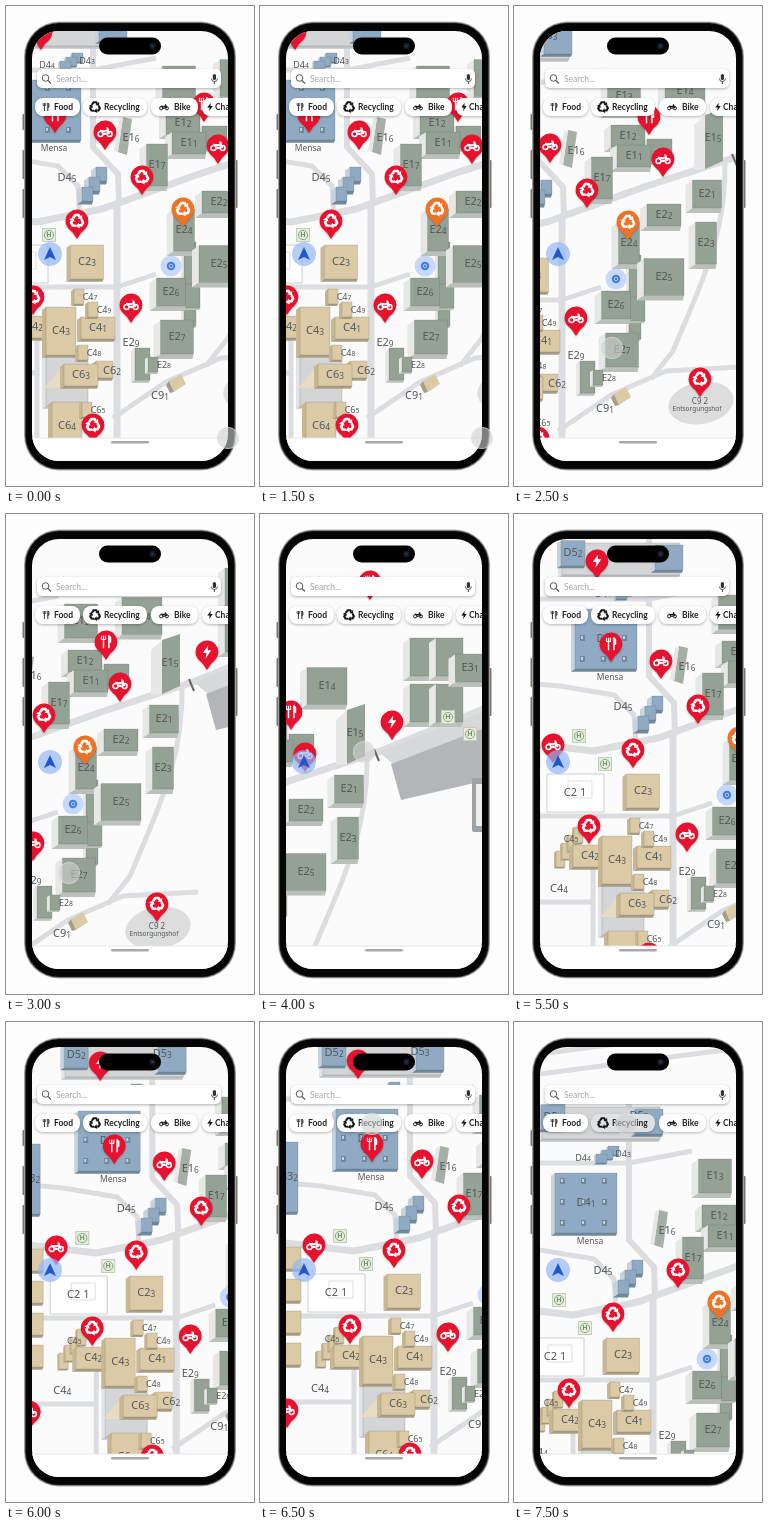
These frames come from a looping animation (248x480 px, 8 s). An HTML page with a canvas:

```html
<!DOCTYPE html>
<html lang="en">
<head>
<meta charset="utf-8">
<title>Campus map</title>
<style>
html,body{margin:0;width:100%;height:100%;overflow:hidden;background:#fdfdfd}
canvas{display:block;width:248px;height:480px}
</style>
</head>
<body>
<canvas id="stage"></canvas>
<script>
const cv = document.getElementById('stage');
const g = cv.getContext('2d');
const dpr = window.devicePixelRatio || 1;
cv.width = 248 * dpr;
cv.height = 480 * dpr;

const RED = '#e6122e', ORANGE = '#ee7326', INK = '#53575a';
const UI = 'Lato, "Open Sans", sans-serif';
const MAP = '"Noto Sans", "Open Sans", sans-serif';
const STEP = 500, LOOP = 8000;

// face, side, base
const green = ['#94a295', '#e6e8e6', '#b9c1ba'];
const tan = ['#dbcaa5', '#c9b792', '#a89e88'];
const blue = ['#8faac2', '#c6d2dd', '#71899d'];
const gray = ['#d3d5d7', '#e3e4e5', '#c1c3c5'];

// face width and height
const WIDE = [34, 22], MID = [29, 28], SQUARE = [33, 34], BIG = [40, 37],
      TALL = [21, 42], DEEP = [30, 48];

// when the map rests where; it eases out in between
const pans = [
  { t: 2000, x: 0, y: 0 }, { t: 2500, x: -63, y: 13 }, { t: 3000, x: -98, y: 30 },
  { t: 3500, x: -98, y: 30 }, { t: 4000, x: -167, y: 100 }, { t: 5000, x: 27, y: 31 },
  { t: 5500, x: 48, y: 21 }, { t: 6500, x: 63, y: 13 }, { t: 7000, x: 28, y: 77 }
];
// a drag holds on to a map point, a rest to a stage point
const touches = [
  { from: 0, to: 1500, x: 222, y: 432 },
  { from: 2000, to: 3000, x: 161, y: 329, drag: true },
  { from: 3500, to: 4000, x: 271, y: 138, drag: true },
  { from: 6500, to: 7500, x: 112, y: 102 }
];

const pins = {
  charge: [[35, 26], [299, 108]],
  food: [[49, 109], [198, 98], [277, -32]],
  bike: [[99, 126], [212, 140], [125, 299], [-9, 210], [-36, 375]],
  recycle: [[136, 171], [71, 215], [27, 291], [87, 419], [249, 360]]
};

function panAt(t) {
  const i = pans.findIndex(p => p.t >= t);
  if (i < 0) return pans[pans.length - 1];
  if (i === 0) return pans[0];
  const a = pans[i - 1], b = pans[i], k = 1 - ((b.t - t) / (b.t - a.t)) ** 2;
  return { x: a.x + (b.x - a.x) * k, y: a.y + (b.y - a.y) * k };
}

function poly(pts, fill) {
  g.beginPath();
  pts.forEach(([x, y]) => g.lineTo(x, y));
  g.closePath();
  g.fillStyle = fill; g.fill();
}
function line(pts, color, w) {
  g.beginPath();
  pts.forEach(([x, y]) => g.lineTo(x, y));
  g.strokeStyle = color; g.lineWidth = w; g.stroke();
}
function disc(x, y, r, fill) {
  g.beginPath(); g.arc(x, y, r, 0, 7); g.fillStyle = fill; g.fill();
}
function ring(x, y, r, color, w) {
  g.beginPath(); g.arc(x, y, r, 0, 7); g.strokeStyle = color; g.lineWidth = w; g.stroke();
}
function rr(x, y, w, h, r, fill) {
  g.beginPath(); g.roundRect(x, y, w, h, r); g.fillStyle = fill; g.fill();
}
function frame(x, y, w, h, color) {
  g.strokeStyle = color; g.lineWidth = .7; g.strokeRect(x, y, w, h);
}
function text(s, x, y, font, color, align = 'left') {
  g.font = font; g.fillStyle = color; g.textAlign = align; g.textBaseline = 'middle';
  g.fillText(s, x, y);
}
function shadow(color, blur, y) {
  g.shadowColor = color; g.shadowBlur = blur * dpr; g.shadowOffsetY = y * dpr;
}
function noShadow() { shadow('transparent', 0, 0); }

// a face with depth to the left and below
function block(x, y, w, h, [face, side, base], d = 4) {
  const r = x + w, b = y + h, k = d * .7;
  poly([[x, y], [x - d, y + k], [x - d, b + k], [x, b]], side);
  poly([[x - d, b + k], [x, b], [r, b], [r - 1, b + k]], base);
  rr(x, y, w, h, 0, face);
  frame(x, y, w, h, 'rgba(85,88,85,.3)');
}

function label(name, x, y, size = 11) {
  const big = size + 'px ' + MAP, small = size * .76 + 'px ' + MAP;
  const head = name.slice(0, -1), tail = name.slice(-1);
  g.font = big; const a = g.measureText(head).width;
  g.font = small; const b = g.measureText(tail).width;
  text(head, x - (a + b) / 2, y, big, INK);
  text(tail, x + (a - b) / 2, y + 1.2, small, INK);
}

// a building with its name in the middle of the face
function hall(name, x, y, [w, h], tone) {
  block(x - w / 2, y - h / 2, w, h, tone, tone === green ? 7 : 4);
  label(name, x, y);
}
// a small building to the left of its name
function annex(name, x, y, tone) {
  block(x - 16, y - 8, 10, 15, tone, 3);
  label(name, x, y, 9);
}

const icons = {
  food() {
    line([[-2, -5], [-2, 5]], g.ink, 1.1);
    line([[-3.7, -5], [-3.7, -2], [-.3, -2], [-.3, -5]], g.ink, .8);
    line([[2.3, 5], [2.3, -5], [3.6, -3.5], [3.6, 0], [2.3, .5]], g.ink, 1.2);
  },
  bike() {
    ring(-3.6, 1.6, 2, g.ink, 1.2); ring(3.6, 1.6, 2, g.ink, 1.2);
    line([[-4, -1], [0, -.5], [2, -1.5], [3.6, 1.6]], g.ink, 1.7);
    line([[-2, 1.5], [1.2, 1.5]], g.ink, 1.6);
    line([[1, -3.3], [2.4, -3], [2.6, -1]], g.ink, .9);
  },
  recycle() {
    for (let i = 0; i < 3; i++) {
      g.save(); g.rotate(i * Math.PI * 2 / 3);
      line([[-3, -2.4], [-1.4, -4.8], [1.2, -4.8], [2.2, -3.2]], g.ink, 2.1);
      poly([[.4, -2], [4.2, -1.2], [4.1, -4.9]], g.ink);
      g.restore();
    }
  },
  charge() {
    poly([[1, -5.3], [-3.4, .7], [-.4, .7], [-1.2, 5.3], [3.4, -1.4], [.5, -1.4]], g.ink);
  }
};
function icon(kind, x, y, s, color) {
  g.save(); g.translate(x, y); g.scale(s, s);
  g.ink = color; icons[kind](); g.restore();
}

function pin(kind, x, y, color) {
  shadow('rgba(0,0,0,.25)', 2, 1);
  g.beginPath();
  g.arc(x, y, 11.4, Math.PI * .76, Math.PI * .24);
  g.quadraticCurveTo(x + 3, y + 12, x, y + 18);
  g.quadraticCurveTo(x - 3, y + 12, x - 8.3, y + 7.8);
  g.fillStyle = color; g.fill();
  noShadow();
  icon(kind, x, y, 1.25, '#fff');
}

function stop(x, y) {
  rr(x - 7, y - 7, 14, 14, 1, '#e6eddf');
  frame(x - 6.5, y - 6.5, 13, 13, '#b5c2aa');
  ring(x, y, 4.6, '#8ba67f', 1);
  text('H', x, y + .4, 'bold 7px ' + MAP, '#6f9363', 'center');
}

function roads() {
  const c = '#dcdde0';
  const road = (w, ...pts) => line(pts, c, w);
  g.lineJoin = 'round';
  road(7, [-80, 203], [31, 216], [96, 203], [193, 168], [285, 138], [400, 91]);
  road(7, [111, 198], [111, 450]);
  road(5, [-80, 281], [111, 281], [150, 268]);
  road(6, [87, 0], [87, 141], [112, 168], [113, 198]);
  road(5, [-60, 146], [-2, 151], [52, 160], [72, 180], [74, 212]);
  road(5, [-60, 64], [87, 64], [150, 52]);
  road(5, [31, 330], [31, 450]);
  road(5, [-80, 367], [31, 367]);
  road(5, [107, 412], [160, 376], [215, 352], [290, 348]);
  for (const y of [-24, -44]) road(5, [-10, y], [190, y - 26]);
  g.beginPath(); g.moveTo(274, 140);
  g.bezierCurveTo(276, 215, 250, 265, 222, 332); g.lineTo(200, 360);
  g.lineWidth = 5; g.stroke();
}

function west() {
  rr(-15, 239, 57, 38, 0, '#fff');
  frame(-15, 239, 57, 38, '#b9bbbd');
  frame(6, 246, 24, 17, '#cfd0d2');
  text('C2 1', 13, 258, '11px ' + MAP, INK, 'center');

  block(0, 8, 118, 32, gray);
  block(93, 10, 28, 25, blue);
  hall('D52', 11, 18, [24, 25], blue);
  label('D53', 97, 17);
  hall('B32', -34, 142, [18, 70], blue);

  hall('D41', 44, 104, [62, 60], blue);
  for (let i = 0; i < 9; i++) {
    const x = 18 + i % 3 * 21, y = 79 + (i / 3 | 0) * 21;
    rr(x, y, 5, 6, 0, '#71879b');
    rr(x + 1, y + 1, 2, 3, 0, '#c4d1dc');
  }
  text('Mensa', 48, 143, '8.5px ' + MAP, INK, 'center');
  for (let i = 0; i < 3; i++) {
    block(90 - i * 7, 161 + i * 10, 11, 14, blue, 5);
    block(66 - i * 6, 47 + i * 4, 11, 9, blue, 2);
  }
  label('D45', 61, 172);
  label('D44', 41, 59, 9);
  label('D43', 81, 55, 9);
}

function south() {
  block(40, 345, 42, 55, gray);
  for (let i = 0; i < 4; i++) {
    block(-6 + i * 6, 316 - i * 8, 9, 16, tan, 2);
    block(-46, 212 + i * 32, 24, 22, tan);
  }
  label('C45', 9, 304, 9);
  label('C44', -3, 354);
  hall('C23', 81, 256, SQUARE, tan);
  hall('C42', 28, 321, WIDE, tan);
  hall('C43', 55, 325, DEEP, tan);
  hall('C41', 92, 322, WIDE, tan);
  hall('C64', 61, 420, DEEP, tan);
  annex('C47', 84, 291, tan);
  annex('C49', 98, 304, tan);
  annex('C48', 88, 347, tan);
  annex('C65', 92, 404, tan);
  block(90, 355, 17, 17, tan);
  label('C62', 106, 365);
  // long light flank of the hall
  poly([[58, 359], [80, 359], [62, 382], [38, 382]], '#e6dcc4');
  hall('C63', 75, 369, WIDE, tan);
  poly([[163, 375], [175, 368], [180, 378], [168, 386]], tan[0]);
  poly([[163, 375], [168, 386], [164, 387], [160, 379]], tan[2]);
  label('C91', 154, 390);

  g.beginPath(); g.ellipse(250, 384, 33, 21, -.18, 0, 7);
  g.fillStyle = '#dcdddc'; g.fill();
  text('C9 2', 249, 383, '8px ' + MAP, INK, 'center');
  text('Entsorgungshof', 246, 390, '6.5px ' + MAP, INK, 'center');
}

function east() {
  poly([[286, 138], [420, 86], [420, 110], [300, 150]], '#d7d8da');
  poly([[298, 150], [420, 103], [420, 160], [308, 186]], '#b4b5b8');
  rr(379, 164, 30, 54, 2, '#9fa2a5');
  rr(383, 170, 26, 42, 1, '#eeeeef');
  line([[281, 135], [286, 147]], '#666', 2);

  // slanted houses
  poly([[117, 111], [126, 113], [121, 149], [112, 146]], '#a5afa6');
  poly([[117, 111], [113, 113], [108, 145], [112, 146]], green[1]);
  poly([[254, 96], [272, 90], [272, 142], [254, 150]], green[0]);
  poly([[254, 96], [243, 106], [243, 151], [254, 150]], green[1]);
  label('E16', 125, 132);
  label('E15', 262, 119);

  for (let i = 0; i < 4; i++)
    block(317 + i % 2 * 26, 24 + (i >> 1) * 46, 27, 38, green, 7);
  hall('E31', 377, 54, MID, green);

  block(196, 120, 25, 22, green, 5);
  block(178, 236, 12, 84, green, 3);
  block(172, 278, 22, 24, green, 3);
  hall('E13', 173, 77, SQUARE, green);
  hall('E12', 177, 117, WIDE, green);
  hall('E11', 183, 137, WIDE, green);
  hall('E14', 234, 72, BIG, green);
  hall('E17', 151, 159, TALL, green);
  hall('E21', 256, 175, MID, green);
  hall('E22', 213, 196, WIDE, green);
  hall('E23', 255, 224, TALL, green);
  hall('E24', 178, 224, TALL, green);
  hall('E25', 213, 258, BIG, green);
  hall('E26', 165, 286, MID, green);
  hall('E27', 171, 331, SQUARE, green);
  block(129, 342, 15, 32, green);
  annex('E28', 158, 359, green);
  label('E29', 125, 337);
}

function world(filtered) {
  roads();
  west();
  south();
  east();
  stop(17, 201); stop(43, 229); stop(355, 103); stop(377, 120);

  disc(165, 260, 10.5, 'rgba(165,196,250,.6)');
  disc(165, 260, 4.2, '#3f7be0');
  ring(165, 260, 1.8, '#cfe0ff', .8);

  for (const kind in pins)
    if (!filtered || kind === 'recycle')
      for (const [x, y] of pins[kind]) pin(kind, x, y, RED);
  pin('recycle', 177, 203, ORANGE);
}

function chip(kind, s, x, w, tx, active) {
  shadow('rgba(0,0,0,.28)', 3, 1);
  rr(x, 92, w, 18, 8, active ? '#dfe2e5' : '#fff');
  noShadow();
  icon(kind, x + (tx - x) / 2 + 1.5, 101, kind === 'recycle' ? 1 : .8, '#151515');
  text(s, tx, 101.3, 'bold 8.5px ' + UI, '#222');
}

function controls(active) {
  shadow('rgba(0,0,0,.3)', 3, 1);
  rr(31, 63, 184, 19, 5, '#fff');
  noShadow();
  ring(39.5, 72, 3.3, '#555', 1);
  line([[42, 74.5], [45, 77.5]], '#555', 1.1);
  text('Search...', 50, 73, '8.5px ' + UI, '#a4a4a4');
  rr(206.8, 68, 3.2, 6, 1.6, '#333');
  g.beginPath(); g.arc(208.4, 72.5, 3, 0, Math.PI);
  g.strokeStyle = '#333'; g.lineWidth = .8; g.stroke();
  line([[208.4, 75.5], [208.4, 78]], '#333', .9);

  chip('food', 'Food', 29, 45, 48);
  chip('recycle', 'Recycling', 77, 64, 98, active);
  chip('bike', 'Bike', 145, 47, 168);
  chip('charge', 'Charging', 196, 62, 209);
}

function shell() {
  for (const [y, h] of [[108, 16], [144, 29], [183, 29]]) rr(16.5, y, 3, h, 1, '#77766f');
  rr(228.5, 154, 3, 48, 1, '#77766f');
  ['#b4b4b0', '#6d6d6a', '#1c1c1b', '#050505'].forEach((c, i) => {
    const d = i * .7;
    rr(18 + d, 15.5 + d, 212 - 2 * d, 449 - 2 * d, 35 - d, c);
  });
}

function draw(ms) {
  const t = Math.floor(ms % LOOP / STEP) * STEP;
  const pan = panAt(t), filtered = t >= 7000;
  g.setTransform(dpr, 0, 0, dpr, 0, 0);
  g.fillStyle = '#fdfdfd'; g.fillRect(0, 0, 248, 480);
  shell();

  g.save();
  g.beginPath(); g.roundRect(26, 25, 196, 430, 27); g.clip();
  g.fillStyle = '#fbfbfb'; g.fillRect(26, 25, 196, 430);
  g.save();
  g.beginPath(); g.rect(26, 25, 196, 407); g.clip();
  g.translate(pan.x, pan.y);
  world(filtered);
  g.restore();

  disc(44, 248, 12, 'rgba(145,182,250,.68)');
  poly([[44, 241], [50, 254], [44, 251], [38, 254]], '#1f57cf');
  controls(filtered);
  g.fillStyle = '#fff'; g.fillRect(26, 432, 196, 24);
  line([[26, 432], [222, 432]], '#e4e4e4', .8);
  rr(105, 435, 38, 2.4, 1.2, '#a9a9a9');
  g.restore();

  rr(93, 31.5, 62, 17, 8.5, '#000');
  disc(146.5, 40, 3.2, '#111a2b');
  disc(146.5, 40, 1.3, '#26395c');

  const touch = touches.find(p => t >= p.from && t <= p.to);
  if (touch) {
    const x = touch.x + (touch.drag ? pan.x : 0), y = touch.y + (touch.drag ? pan.y : 0);
    disc(x, y, 11, 'rgba(205,207,207,.6)');
    ring(x, y, 10.6, 'rgba(235,235,235,.6)', .8);
  }
}

function tick() {
  draw(performance.now());
  requestAnimationFrame(tick);
}
tick();
</script>
</body>
</html>
```
